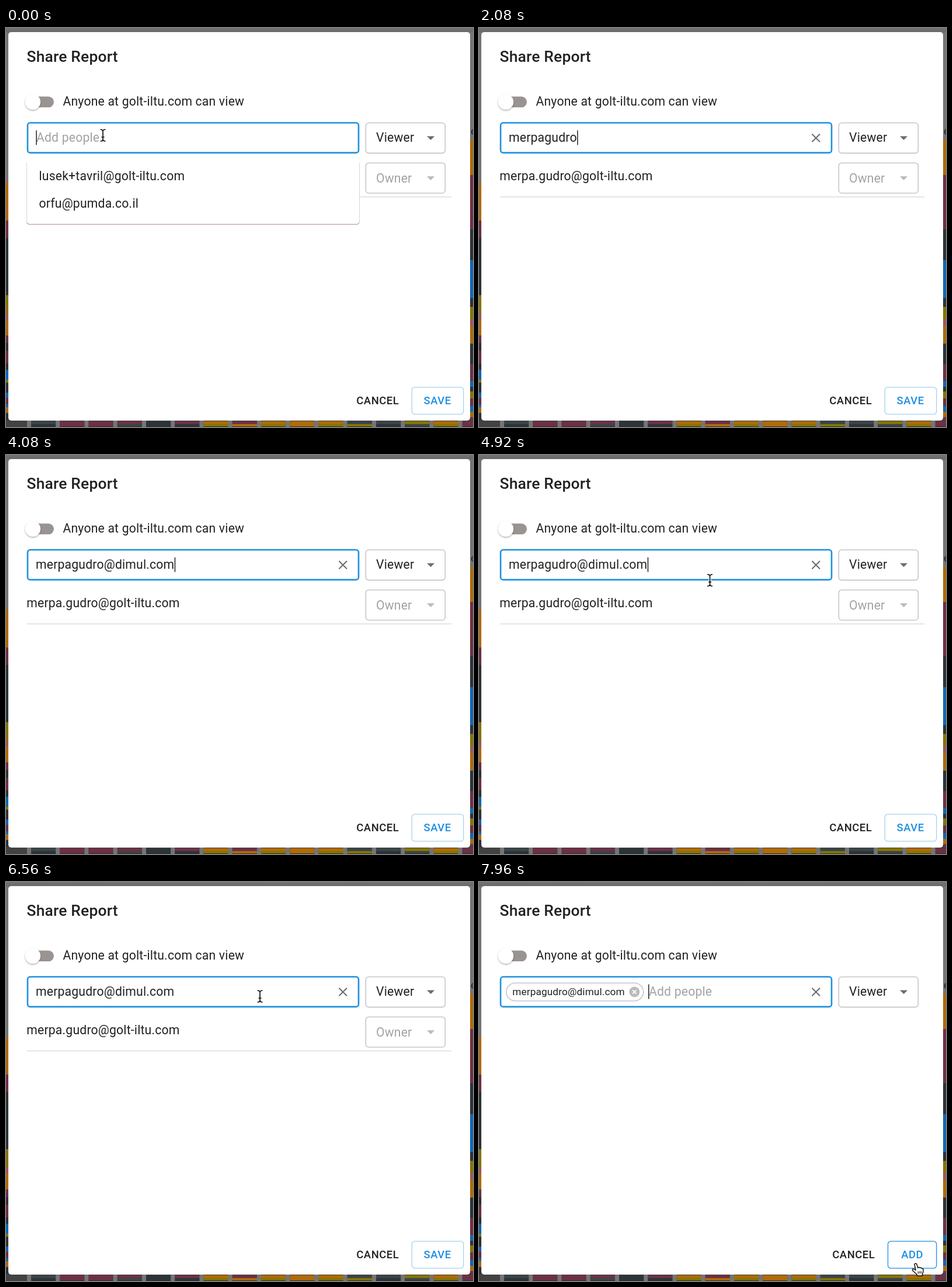
Recreate the animation shown at these times as an HTML page with a canvas. Size 800x684 px, loop 8000 ms.

```html
<!DOCTYPE html>
<html lang="en">
<head>
<meta charset="utf-8">
<title>Share Report</title>
<style>
  html, body { margin: 0; width: 100%; height: 100%; overflow: hidden; background: #757575; }
  canvas, svg { position: absolute; left: 0; top: 0; width: 800px; height: 684px; }
  text { font: 400 21.15px Roboto, sans-serif; letter-spacing: .00938em; fill: #212121; white-space: pre; }
  .title { font-size: 26.4px; font-weight: 500; letter-spacing: .0075em; }
  .button { font-size: 18.45px; font-weight: 500; letter-spacing: .02857em; }
  .chip { font-size: 17.15px; }
  .hint { fill: #a5a1a2; }
  .blue { fill: #1e8fe3; }
  .box { fill: #fff; stroke: #bdbabf; stroke-width: 1.3; }
  .cross { fill: none; stroke: #6c6c6c; stroke-width: 2; }
</style>
</head>
<body>
<canvas id="back" width="800" height="684"></canvas>
<svg viewBox="0 0 800 684">
  <defs>
    <filter id="soft" x="-50%" y="-50%" width="200%" height="200%">
      <feDropShadow dx="0" dy="1.5" stdDeviation="1.5" flood-opacity=".35"/>
    </filter>
  </defs>

  <rect x="4" y="7" width="791" height="666" rx="5" fill="#fff"/>
  <text class="title" x="35.5" y="58">Share Report</text>

  <rect x="37" y="117.5" width="45" height="18.6" rx="9.3" fill="#999492"/>
  <circle cx="46" cy="126.8" r="13.1" fill="#fff" filter="url(#soft)"/>
  <text x="97.5" y="133">Anyone at golt-iltu.com can view</text>

  <rect class="box" x="616.3" y="162.7" width="136" height="51.8" rx="5"/>
  <text x="634" y="195">Viewer</text>
  <path d="M721 185.5h13.2l-6.6 6.6z" fill="#6c6c6c"/>

  <g id="people">
    <rect class="box" x="616.3" y="231.3" width="136" height="51.8" rx="5"/>
    <text class="hint" x="634" y="265">Owner</text>
    <path d="M721 254.3h13.2l-6.6 6.6z" fill="#bcbabb"/>
    <text x="35.3" y="261">merpa.gudro@golt-iltu.com</text>
    <path d="M36 289.5H763" stroke="#dedcde" stroke-width="1.3"/>
  </g>

  <rect id="field" x="37" y="162.5" width="567" height="51.4" rx="4.5" fill="#fff"/>
  <g id="chip">
    <rect class="box" x="46.7" y="173.2" width="235" height="30.6" rx="15.3"/>
    <text class="chip" x="57.3" y="194">merpagudro@dimul.com</text>
    <circle cx="266.3" cy="188.4" r="8.9" fill="#bdbabb"/>
    <path d="M263 185.1l6.6 6.6m0-6.6l-6.6 6.6" stroke="#fff" stroke-width="1.8"/>
  </g>
  <text id="typed" x="51" y="195"></text>
  <text id="hint" class="hint" y="195">Add people</text>
  <path id="clear" class="cross" d="M570.4 181.7l13.6 13.6m0-13.6l-13.6 13.6"/>
  <rect id="caret" y="175.5" width="1.4" height="25" fill="#111"/>

  <g id="menu">
    <rect x="35" y="228" width="571" height="109" rx="5" fill="#c9c3c7"/>
    <path d="M37 333Q37 336.4 41 336.4H600Q604 336.4 604 333" fill="none" stroke="#b98a9c" stroke-width="1.3"/>
    <rect x="35.7" y="221" width="569.6" height="115" rx="5" fill="#fff"/>
    <text x="56.5" y="261">lusek+tavril@golt-iltu.com</text>
    <text x="56.5" y="308">orfu@pumda.co.il</text>
  </g>

  <g id="save">
    <text class="button" x="600.3" y="645.3">CANCEL</text>
    <rect class="box" x="695.3" y="615.8" width="88.4" height="46.4" rx="5" style="stroke:#a6d2ee"/>
    <text class="button blue" x="715.5" y="645.3">SAVE</text>
  </g>
  <g id="add">
    <text class="button" x="605.3" y="645.3">CANCEL</text>
    <rect id="addBox" class="box" x="700.5" y="615.8" width="83.2" height="46.4" rx="5"/>
    <text class="button blue" x="723.2" y="645.3">ADD</text>
  </g>

  <g id="beam" fill="none">
    <path id="beamLine" d="M-4.5-10Q0-10 0-7Q0-10 4.5-10M0-7V7M-4.5 10Q0 10 0 7Q0 10 4.5 10M-2.5 3H2.5" stroke="#fff" stroke-width="3.6"/>
    <use href="#beamLine" style="stroke:#111"/>
    <path d="M-4.5-10Q0-10 0-7Q0-10 4.5-10M0-7V7M-4.5 10Q0 10 0 7Q0 10 4.5 10M-2.5 3H2.5" stroke="#111" stroke-width="1.7"/>
  </g>
  <path id="arrow" d="M0 0V18.5L4.2 14.6L7.2 21.6L10.5 20.2L7.5 13.4H13.2Z" fill="#000" stroke="#fff" stroke-width="1.3"/>
  <g id="hand">
    <path d="M-3 1.5Q-2-1 .5.5L3 7.5Q5 5.5 6.5 7.5Q8.5 6.5 9.5 8.5Q12 8 12 11Q12.5 15 10.5 17.5V21H1.5L1 18.5Q-3 15.5-6.5 11.5Q-7 8.5-4 9.5L-1 11.5Z"
      fill="#fff" stroke="#111" stroke-width="1.5" stroke-linejoin="round"/>
    <path d="M3 13.5l.6 4m2-4.2l.4 4m2.2-4.2v4" stroke="#111" stroke-width="1.1"/>
  </g>
</svg>

<script>
const LOOP = 8000;
const ADDRESS = 'merpagudro@dimul.com';
const BLUR = 5250, FOCUS = 6000, ENTER = 6900;
const $ = id => document.getElementById(id);
const show = (id, on) => { $(id).style.display = on ? '' : 'none'; };

const GREY = '#757575', ORANGE = '#b06a08', WINE = '#6d3045', DARK = '#2c3439',
      OLIVE = '#857400', BLUE = '#1167b3', ROSE = '#a0575c', SLATE = '#3b4448';

function paintBack() {
  const c = $('back').getContext('2d');
  const fill = (color, x, y, w, h) => { c.fillStyle = color; c.fillRect(x, y, w, h); };
  const bands = (x, w, list) => list.forEach(([y, color]) => fill(color, x, y, w, 684 - y));

  fill(GREY, 0, 0, 800, 684);
  bands(0, 5, [[265, ORANGE], [330, WINE], [360, DARK], [458, OLIVE], [490, ROSE], [500, ORANGE],
    [527, WINE], [540, DARK], [553, WINE], [575, DARK], [586, BLUE], [603, OLIVE], [608, DARK],
    [625, BLUE], [634, WINE], [645, BLUE], [650, ORANGE], [660, DARK]]);
  bands(794, 6, [[192, ORANGE], [252, WINE], [345, DARK], [398, BLUE], [463, DARK], [478, OLIVE],
    [500, ROSE], [511, ORANGE], [541, DARK], [576, WINE], [605, BLUE], [615, DARK], [623, OLIVE],
    [635, WINE], [648, BLUE], [658, ORANGE], [667, WINE]]);
  c.fillStyle = '#262626';
  c.font = '18px Roboto, sans-serif';
  c.fillText('e', 796, 183);

  // Row of chart columns below the dialog
  fill('#424242', 0, 672, 800, 12);
  const tops = [SLATE, WINE, WINE, WINE, DARK, WINE, ORANGE, WINE, ORANGE, ORANGE, ORANGE, SLATE, SLATE, OLIVE, ORANGE, WINE];
  const lows = [DARK, WINE, WINE, SLATE, DARK, DARK, OLIVE, ORANGE, OLIVE, ORANGE, OLIVE, OLIVE, DARK, SLATE, OLIVE, WINE];
  tops.forEach((color, i) => {
    const x = 43 + i * 49.6 - i * .35;
    fill(GREY, x - 7, 673, 7, 11);
    fill(color, x, 674, 42.5, 5);
    fill(lows[i], x, 679, 42.5, 4);
    fill('#2b2b2b', x, 683, 42.5, 1);
  });

  const edge = c.createLinearGradient(0, 0, 0, 7);
  edge.addColorStop(0, 'rgba(0,0,0,.02)');
  edge.addColorStop(1, 'rgba(0,0,0,.1)');
  fill(edge, 0, 0, 800, 7);
}

function typedCount(t) {
  const name = Math.floor((t - 920) / 115) + 1;
  const host = Math.floor((t - 2300) / 150) + 1;
  return Math.max(0, Math.min(10, name)) + Math.max(0, Math.min(10, host));
}

// Time of the latest event that restarts the caret's blink
function blinkStart(t, count) {
  if (t >= ENTER) return ENTER;
  if (t >= FOCUS) return FOCUS;
  if (!count) return 0;
  return count <= 10 ? 920 + (count - 1) * 115 : 2300 + (count - 11) * 150;
}

const path = [[0, 166, 184], [4500, 166, 184], [5150, 487, 227], [5580, 487, 227],
              [5950, 435, 196], [7250, 435, 196], [7850, 749, 654], [LOOP, 749, 654]];

function pointer(t) {
  const i = path.findIndex(p => p[0] > t);
  const [t0, x0, y0] = path[i - 1], [t1, x1, y1] = path[i];
  const p = (t - t0) / (t1 - t0), e = p * p * (3 - 2 * p);
  return [x0 + (x1 - x0) * e, y0 + (y1 - y0) * e];
}

const inside = (x, y, l, t, r, b) => x >= l && x <= r && y >= t && y <= b;

function draw(t) {
  const count = typedCount(t);
  const focused = t < BLUR || t >= FOCUS;
  const chip = t >= ENTER;
  const [x, y] = pointer(t);
  const hidden = (t >= 900 && t < 4500) || (t >= ENTER && t < 7250);
  const overField = inside(x, y, 36, 161, 605, 215);
  const overAdd = chip && inside(x, y, 700, 615, 784, 663);

  $('typed').textContent = chip ? '' : ADDRESS.slice(0, count);
  const field = $('field');
  field.setAttribute('stroke', focused ? '#1f8fdf' : '#b9b7b8');
  field.setAttribute('stroke-width', focused ? 2.6 : 1.3);

  show('chip', chip);
  show('people', !chip);
  show('save', !chip);
  show('add', chip);
  $('addBox').style.stroke = overAdd ? '#1e8fe3' : '#a6d2ee';
  show('menu', count < 2);
  show('hint', chip || !count);
  $('hint').setAttribute('x', chip ? 291 : 52);
  show('clear', count > 0 && (focused || overField));

  const start = chip ? 290 : count ? 51.4 + $('typed').getComputedTextLength() : 51.4;
  $('caret').setAttribute('x', start);
  show('caret', focused && (t - blinkStart(t, count)) % 1000 < 500);

  const kind = overField ? 'beam' : overAdd ? 'hand' : 'arrow';
  for (const id of ['beam', 'arrow', 'hand']) {
    show(id, !hidden && id === kind);
    $(id).setAttribute('transform', `translate(${x} ${y})`);
  }
}

paintBack();
const begin = performance.now();
function tick() {
  draw((performance.now() - begin) % LOOP);
  requestAnimationFrame(tick);
}
tick();
</script>
</body>
</html>
```
